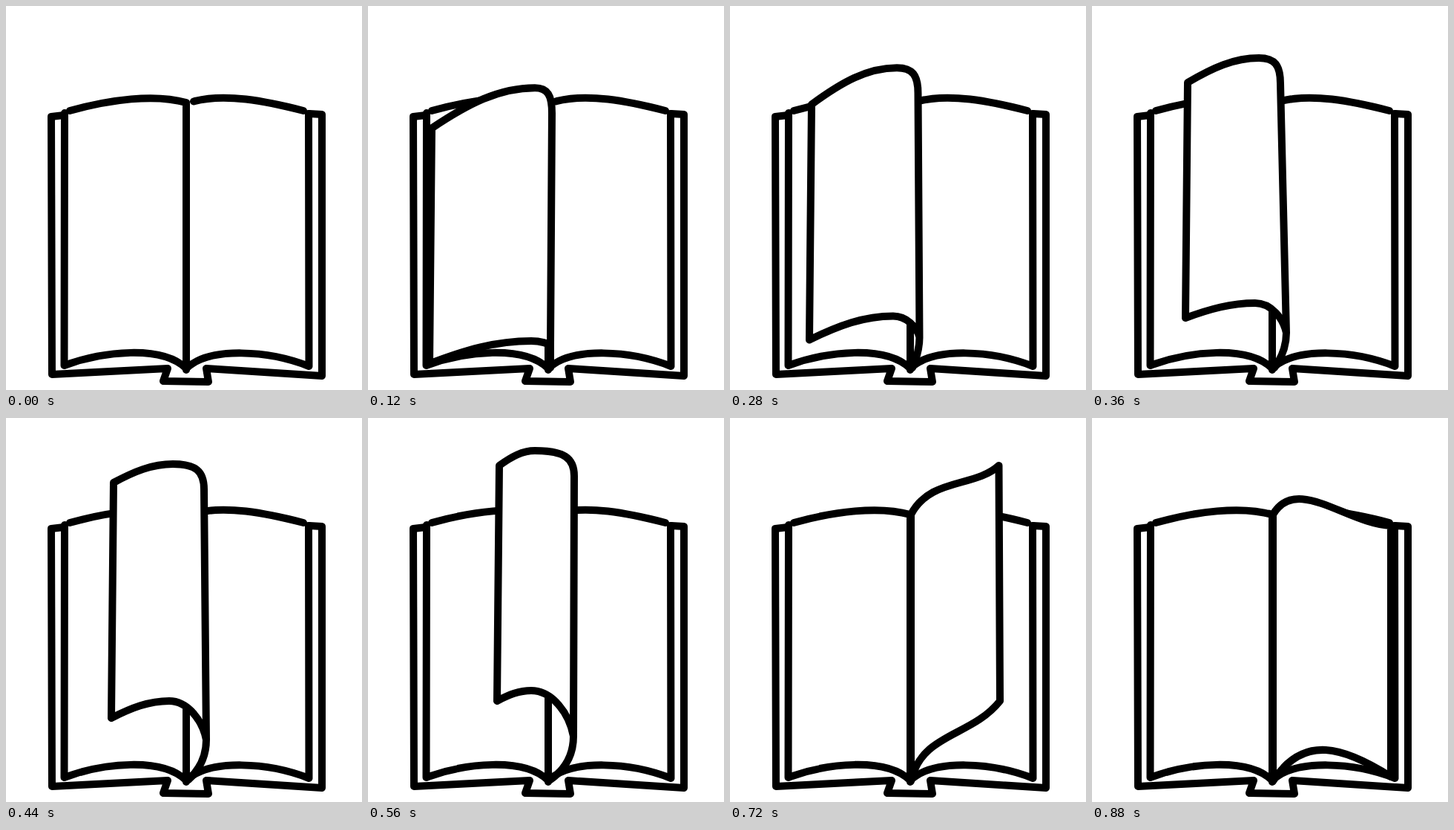
Write an HTML page that moves like this. It is 480 px wide and 517 px high and loops after 960 ms.

```html
<!DOCTYPE html>
<html lang="en">
<head>
<meta charset="utf-8">
<title>Turning page</title>
<style>
  html, body { margin: 0; width: 100%; height: 100%; overflow: hidden; background: #fff; }
  svg { display: block; }
  path { fill: none; stroke: #000; stroke-width: 10; stroke-linecap: round; stroke-linejoin: round; }
  #leaf { fill: #fff; }
</style>
</head>
<body>
<svg width="480" height="517" viewBox="0 0 480 517">
  <!-- cover -->
  <path d="M78 147L61 149L62 496L218 488L212 505L273 506L270 488L426 498L426 146L409 145"/>
  <!-- page block -->
  <path d="M79 144L78.5 484C130 465 210 456 243 488C275 458 355 464 408.5 485L408 145"/>
  <path d="M86 141C140 126 200 118 243 130V490M253 128.5C295 117 350 128 401 141"/>
  <path id="leaf"/>
</svg>
<script>
// Curled sheet: corner (x, y), crest heights of both edges, fold x at top and bottom.
function curled(x, y, crest, low, foldTop, foldLow) {
  const cx = 225, lx = 220, left = x - 3, base = y + 317;
  const foldY = 300 + .35 * low;
  const w = cx - x, h = y - crest;
  const lw = lx - left, lh = base - low;
  const fw = foldLow - lx, fh = foldY - low;
  return `M${x} ${y}` +
    `C${x + .35 * w} ${y - .6 * h} ${x + .65 * w} ${crest} ${cx} ${crest}` +
    `C${cx + .75 * (foldTop - cx)} ${crest} ${foldTop} ${crest + 10} ${foldTop} ${crest + 34}` +
    `L${foldLow} ${foldY}` +
    `C${foldLow - .1 * fw} ${low + .5 * fh} ${lx + .5 * fw} ${low} ${lx} ${low}` +
    `C${left + .65 * lw} ${low} ${left + .35 * lw} ${base - .6 * lh} ${left} ${base}Z` +
    `M${foldLow} ${foldY}Q${foldLow} 465 246 487`;
}

// Flat sheet hinged on the spine: top curve out, bottom curve back.
const hinged = (out, back) => `M244 130C${out}L${back} 244 489Z`;

// Blend two paths of the same structure.
function mix(a, b, t) {
  const to = b.match(/[\d.]+/g).map(Number);
  let i = 0;
  return a.replace(/[\d.]+/g, n => +n + (to[i++] - n) * t);
}

const flat = curled(81, 167, 124, 467, 243, 243);
const rise = curled(91, 162, 96.5, 435, 253, 249);
const bend = curled(129, 103, 70, 400, 254, 262);
const fold = curled(145, 87, 62, 381, 267, 270);
const narrow = curled(177, 64, 44, 367, 278, 277);
const upright = hinged('255 70 280 60 303 13', '303 332C280 382 252 400');
const over = hinged('270 80 330 94 362.5 64', '364 381C325 430 258 424');
const land = hinged('275 76 345 143 403 145', '403 483C340 443 285 425');

// Poses in order; each holds 80 ms unless a longer time is given.
const poses = [
  ['', 120], [mix(flat, rise, .5)], [rise], [mix(rise, bend, .5)], [bend],
  [fold, 120], [narrow], [upright], [over], [mix(over, land, .5)], [land]
];

const leaf = document.getElementById('leaf');
const origin = performance.now();
let shown;

function draw(now) {
  let t = Math.max(0, now - origin) % 960;
  const [d] = poses.find(([, hold = 80]) => (t -= hold) < 0);
  if (d !== shown) leaf.setAttribute('d', shown = d);
  requestAnimationFrame(draw);
}
draw(origin);
</script>
</body>
</html>
```
